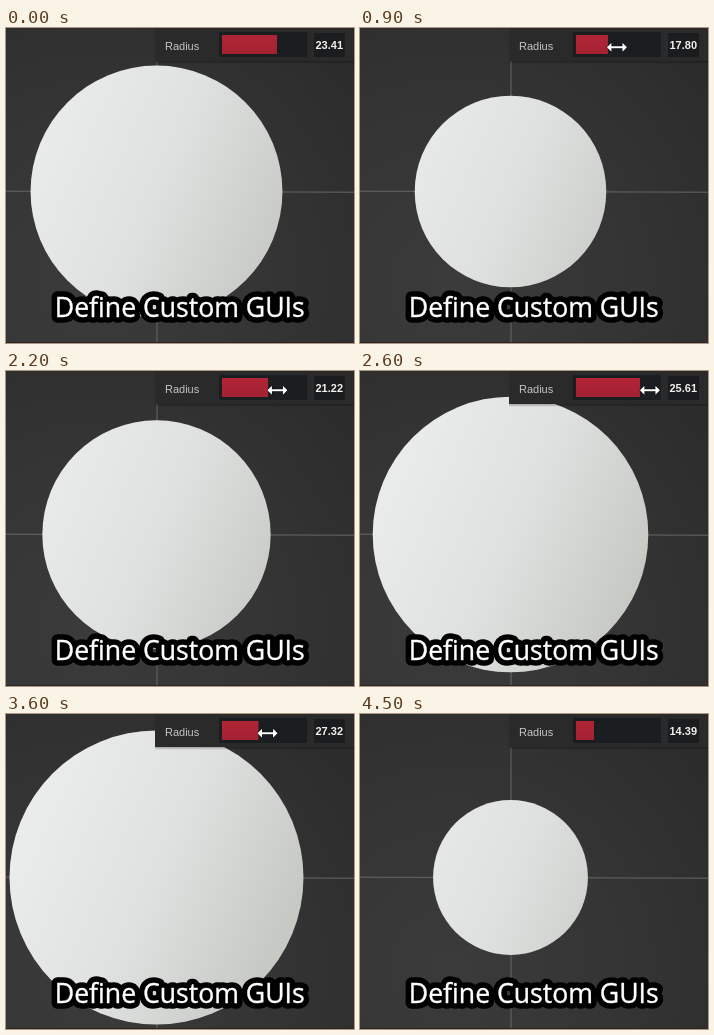
Animation, 348 px wide and 315 px high, one loop 5100 ms. Source, as an HTML page:

```html
<!DOCTYPE html>
<html lang="en">
<head>
<meta charset="utf-8">
<title>Define Custom GUIs</title>
<style>
  html, body { margin: 0; width: 100%; height: 100%; overflow: hidden; background: #333; }
  svg { display: block; width: 348px; height: 315px; }
  .label { font: 11px "Liberation Sans", Arial, sans-serif; fill: #c6c6c6; }
  .value { font: bold 11px "Liberation Sans", Arial, sans-serif; fill: #f0f0f0; }
  .caption { font: 26.6px "Open Sans", "Noto Sans", sans-serif; stroke-linejoin: round; }
  .outline { fill: #000; stroke: #000; stroke-width: 11.5px; }
  .face { fill: #fff; stroke: #fff; stroke-width: .4px; }
</style>
</head>
<body>
<svg viewBox="0 0 348 315">
  <defs>
    <radialGradient id="floor" gradientUnits="userSpaceOnUse" cx="90" cy="255" r="360">
      <stop offset="0" stop-color="#3b3b3b"/>
      <stop offset=".5" stop-color="#343434"/>
      <stop offset="1" stop-color="#2a2a2a"/>
    </radialGradient>
    <linearGradient id="ball" gradientUnits="userSpaceOnUse" x1="25" y1="115" x2="270" y2="225">
      <stop offset="0" stop-color="#eaecec"/>
      <stop offset=".5" stop-color="#dfe1e0"/>
      <stop offset="1" stop-color="#c6c9c4"/>
    </linearGradient>
    <linearGradient id="shade" x1="0" y1="0" x2="0" y2="1">
      <stop offset="0" stop-color="#000" stop-opacity=".3"/>
      <stop offset="1" stop-color="#000" stop-opacity="0"/>
    </linearGradient>
    <linearGradient id="red" x1="0" y1="0" x2="0" y2="1">
      <stop offset="0" stop-color="#b12536"/>
      <stop offset="1" stop-color="#a32232"/>
    </linearGradient>
    <text id="caption" class="caption" x="48.8" y="289">Define Custom GUIs</text>
  </defs>

  <rect width="348" height="315" fill="url(#floor)"/>
  <path d="M0 163.2L348 164.2M151 0V315" stroke="#666" fill="none"/>
  <circle id="sphere" cx="150.5" cy="163.5" fill="url(#ball)"/>

  <rect x="149" y="33" width="199" height="3" fill="url(#shade)"/>
  <rect x="149" width="199" height="33" fill="#2a2a2a"/>
  <text class="label" x="159" y="22">Radius</text>
  <rect x="213" y="4" width="88" height="25" fill="#1b1e20"/>
  <rect id="bar" x="216" y="7" height="19" fill="url(#red)"/>
  <rect x="308" y="5" width="31" height="24" fill="#1b1c1d"/>
  <text id="value" class="value" x="309.5" y="21"></text>

  <path id="arrows" d="M-10 0L-5.5-4.5V-1H5.5V-4.5L10 0L5.5 4.5V1H-5.5V4.5Z"
        fill="#fff" stroke="#000" paint-order="stroke"/>
  <path id="pointer" d="M0 0V16L4 12.5L6.5 18L9 17L6.5 11.5H11.5Z" fill="#fff" stroke="#000"/>

  <use href="#caption" class="outline"/>
  <use href="#caption" class="face"/>
  <rect y="314" width="348" height="1" fill="#2c2426"/>
</svg>

<script>
const LOOP = 5100, TICK = 100;
const ENTER = 300, GRAB = 900, LEAVE = 4500;
const SCALE = 5.38;   // sphere pixels per unit of radius

// The bar eases from key to key; sphere and number update only at the keys.
const keys = [
  [0, 23.41], [800, 23.41], [GRAB, 17.80], [1500, 15.12], [1800, 15.12], [2200, 21.22],
  [2600, 25.61], [3000, 27.32], [3100, 27.32], [3700, 18.59], [4200, 14.39]
];

const easeOut = p => Math.sin(p * Math.PI / 2);
const [sphere, bar, value, arrows, pointer] =
  ["sphere", "bar", "value", "arrows", "pointer"].map(id => document.getElementById(id));

function slider(t) {
  const i = keys.findLastIndex(key => key[0] <= t);
  const [start, shown] = keys[i];
  const [end, next] = keys[i + 1] || [LOOP, shown];
  const held = shown + (next - shown) * easeOut((t - start) / (end - start));
  return { shown, width: 4.1 * (held - 10) };
}

function mouseAt(t, width) {
  if (t < ENTER || t >= LEAVE) return null;
  if (t >= GRAB) return [224 + width * 1.03, 19.3];
  const p = (t - ENTER) / (GRAB - TICK - ENTER);
  return [257 + 4 * Math.sin(p * Math.PI), -8 + 27 * easeOut(p)];
}

function place(node, pos) {
  node.setAttribute("visibility", pos ? "visible" : "hidden");
  if (pos) node.setAttribute("transform", `translate(${pos})`);
}

function draw(t) {
  const { shown, width } = slider(t);
  sphere.setAttribute("r", shown * SCALE);
  bar.setAttribute("width", width);
  value.textContent = shown.toFixed(2);

  const mouse = mouseAt(t, width);
  const outside = mouse && mouse[1] < 4;
  place(pointer, outside ? mouse : null);
  place(arrows, outside ? null : mouse);
}

const begin = performance.now();
function loop() {
  const t = (performance.now() - begin) % LOOP;
  draw(Math.floor(t / TICK) * TICK);
  requestAnimationFrame(loop);
}
loop();
</script>
</body>
</html>
```
